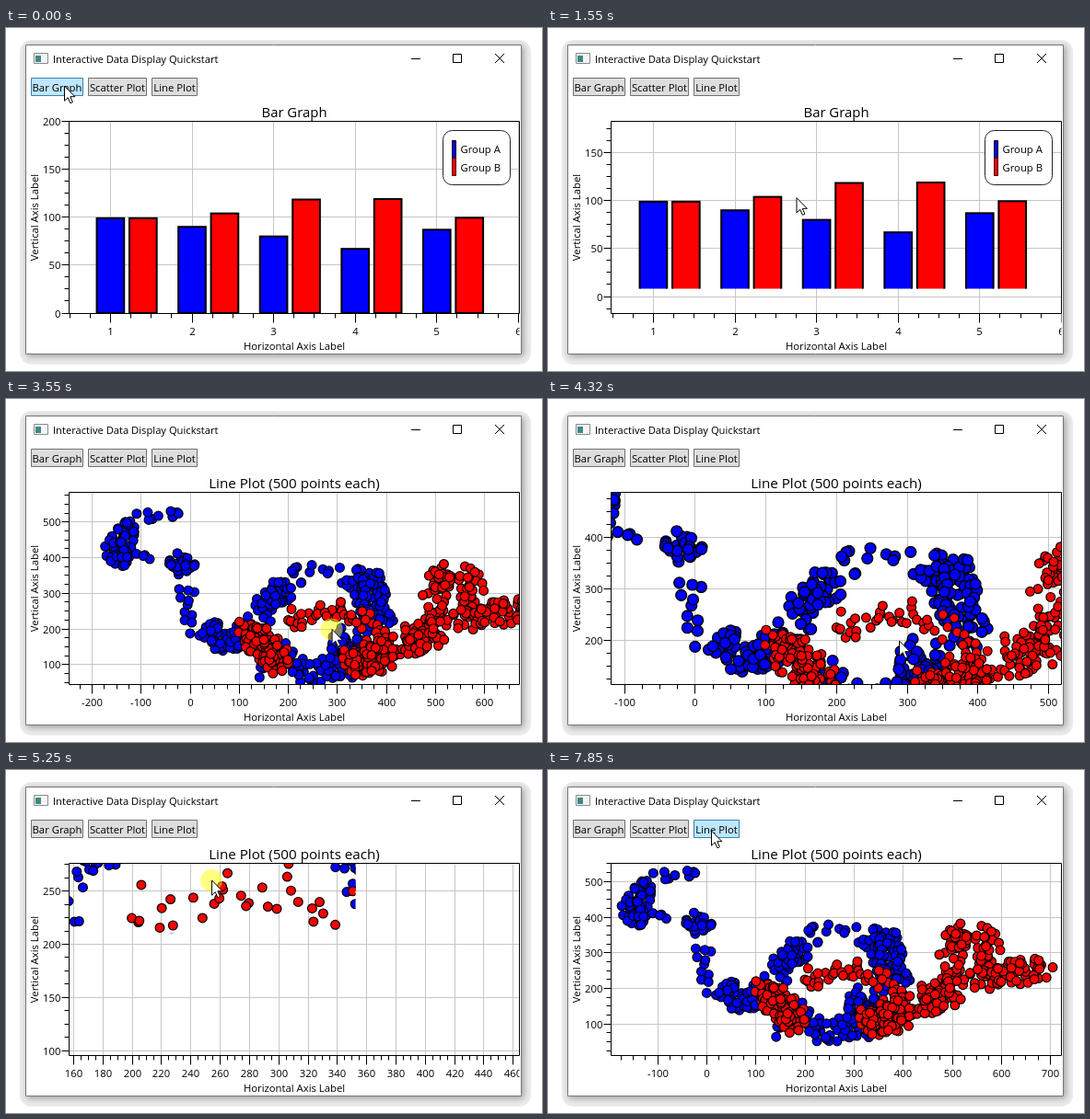
Animation, 582 px wide and 373 px high, one loop 8 s. Source, as an HTML page with a canvas:

```html
<!DOCTYPE html>
<html lang="en">
<head>
<meta charset="utf-8">
<title>Interactive Data Display Quickstart</title>
<style>
  html, body { margin: 0; width: 100%; height: 100%; overflow: hidden; background: #fff; }
  canvas { display: block; }
</style>
</head>
<body>
<canvas id="stage" width="582" height="373"></canvas>
<script>
const ctx = document.getElementById('stage').getContext('2d');
const LOOP = 8000;
const PLOT = { left: 68.5, top: 101.5, right: 557.5, bottom: 310.5 };
const BLUE = '#0000ff', RED = '#ff0000';

// A view maps data to pixels: X = ox + sx * x, Y = oy - sy * y
const BARS = { sx: 88.6, ox: 24.8, sy: 1.042, oy: 310 };
const SCATTER = { sx: 0.533, ox: 172.5, sy: 0.3875, oy: 315 };
const SWAP = 2480, RESET = 7300;

// Mouse moves: start time, end time, destination x, y
const HOME = { x: 63, y: 63 };
const MOVES = [
  [70, 390, 269, 203],
  [620, 840, 225, 215],
  [840, 1080, 313, 233],
  [1080, 1470, 270, 185],
  [1550, 1850, 120, 82],
  [2020, 2330, 118, 66],
  [2480, 2620, 211, 142],
  [2620, 2930, 326, 238],
  [3170, 3930, 381, 263],
  [4660, 4780, 327, 192],
  [4780, 4940, 401, 253],
  [4940, 5250, 223, 120],
  [5250, 5500, 240, 120],
  [5740, 5950, 170, 321],
  [5950, 6350, 301, 321],
  [6350, 6520, 238, 285],
  [6600, 6750, 45, 210],
  [6750, 7050, 45, 319],
  [7460, 7850, 177, 66]
];

const drag = (t, end, mx, my) => ({ t, end, mx, my });
const zoom = t => ({ t, zoom: 1.2 });
const ACTIONS = [
  drag(620, 1550, 1, 1),
  { t: SWAP, view: SCATTER },
  drag(3170, 3930, 1, 1),
  zoom(4020),
  ...Array.from({ length: 5 }, (_, i) => zoom(4320 + 80 * i)),
  drag(4780, 5500, 1, 1),
  drag(5950, 6350, 1, 0),
  drag(6750, 7050, 0, 1),
  { t: RESET, view: SCATTER }
];

function pointer(t) {
  let p = HOME;
  for (const [start, end, x, y] of MOVES) {
    if (t <= start) break;
    const k = Math.min(1, (t - start) / (end - start));
    p = { x: p.x + (x - p.x) * k, y: p.y + (y - p.y) * k };
  }
  return p;
}

function viewAt(t) {
  let v = BARS;
  for (const a of ACTIONS) {
    if (a.t > t) break;
    const p = pointer(a.t);
    if (a.view) {
      v = a.view;
    } else if (a.zoom) {
      v = {
        sx: v.sx * a.zoom, ox: p.x + (v.ox - p.x) * a.zoom,
        sy: v.sy * a.zoom, oy: p.y + (v.oy - p.y) * a.zoom
      };
    } else {
      const q = pointer(Math.min(t, a.end));
      v = { ...v, ox: v.ox + (q.x - p.x) * a.mx, oy: v.oy + (q.y - p.y) * a.my };
    }
  }
  return v;
}

// The plot image is redrawn periodically; in between it is only moved and scaled
const PERIOD = 410, PHASE = 20;
const lastRedraw = t => Math.floor((t - PHASE) / PERIOD) * PERIOD + PHASE;
const lastRescale = t => Math.max(...ACTIONS.filter(a => !a.end && a.t <= t).map(a => a.t));

function makeRandom(seed) {
  return () => (seed = (seed * 16807) % 2147483647) / 2147483647;
}

// Scatters points along a trail of [x, y, count], given in pixels of the fitted view;
// the more points a stretch has, the wider it spreads
function makeCloud(trail, seed) {
  const random = makeRandom(seed);
  const points = [];
  trail.forEach(([x, y, count], i) => {
    const [px, py] = trail[Math.max(0, i - 1)];
    const spread = 5 + 1.7 * Math.sqrt(count);
    for (let n = 0; n < count; n++) {
      const k = random(), angle = random() * 2 * Math.PI, r = spread * Math.sqrt(random());
      points.push({
        x: (px + (x - px) * k + r * Math.cos(angle) - SCATTER.ox) / SCATTER.sx,
        y: (SCATTER.oy - (py + (y - py) * k + r * Math.sin(angle))) / SCATTER.sy
      });
    }
  });
  return points;
}

const blueCloud = makeCloud([
  [157, 114, 3], [110, 122, 9], [95, 145, 20], [95, 162, 34], [110, 158, 12],
  [155, 163, 7], [172, 172, 20], [166, 232, 12], [195, 242, 3], [212, 250, 36],
  [240, 240, 34], [260, 205, 28], [272, 196, 34], [295, 172, 10], [345, 180, 7],
  [368, 190, 30], [368, 212, 56], [386, 236, 22], [342, 250, 7], [345, 278, 60],
  [292, 281, 44], [266, 260, 16], [248, 286, 10]
], 4271);

const redCloud = makeCloud([
  [235, 242, 10], [262, 262, 44], [270, 272, 46], [245, 245, 10], [290, 224, 12],
  [335, 217, 20], [372, 232, 14], [382, 260, 5], [348, 274, 56], [362, 278, 20],
  [408, 250, 42], [440, 242, 48], [440, 190, 36], [448, 177, 22], [485, 182, 20],
  [466, 226, 20], [505, 222, 36], [540, 213, 28]
], 977);

const BAR_A = [99, 90, 80, 67, 87], BAR_B = [99, 104, 118.5, 119, 99.5];
const BUTTONS = [['Bar Graph', 27, 57], ['Scatter Plot', 89, 64], ['Line Plot', 158, 50]];

function text(string, x, y, size = 11.3, align = 'left') {
  ctx.font = `${size}px "Open Sans", "Noto Sans", sans-serif`;
  ctx.textAlign = align;
  ctx.fillStyle = '#000';
  ctx.fillText(string, x, y);
}

function line(x0, y0, x1, y1, color = '#000') {
  ctx.strokeStyle = color;
  ctx.lineWidth = 1;
  ctx.beginPath();
  ctx.moveTo(x0, y0);
  ctx.lineTo(x1, y1);
  ctx.stroke();
}

function box(x, y, w, h, fill, stroke, radius = 0) {
  ctx.beginPath();
  ctx.roundRect(x, y, w, h, radius);
  if (fill) { ctx.fillStyle = fill; ctx.fill(); }
  if (stroke) { ctx.strokeStyle = stroke; ctx.lineWidth = 1; ctx.stroke(); }
}

function drawWindow(mouse) {
  box(0, 0, 582, 373, '#fff');
  box(15, 13, 555, 353, '#ebebeb', null, 13);
  ctx.save();
  ctx.shadowColor = 'rgba(0,0,0,.35)';
  ctx.shadowBlur = 7;
  ctx.shadowOffsetX = ctx.shadowOffsetY = 2;
  box(21, 18, 539, 337, '#fff');
  ctx.restore();
  box(21.5, 18.5, 538, 336, '#fff', '#777');

  box(30.5, 27.5, 15, 11, '#f4f4f4', '#8a8a8a');
  box(32, 30, 6, 7, '#3c8a84');
  text('Interactive Data Display Quickstart', 51, 38, 11.2);
  line(440, 33.5, 450, 33.5);
  box(485.5, 28.5, 9, 9, null, '#000');
  line(531, 28, 541, 38);
  line(541, 28, 531, 38);

  for (const [label, x, w] of BUTTONS) {
    const hover = mouse.x >= x && mouse.x <= x + w && mouse.y >= 54 && mouse.y <= 74;
    box(x + 0.5, 54.5, w - 1, 19, hover ? '#bee6fd' : '#ddd', hover ? '#3c7fb1' : '#707070');
    text(label, x + w / 2, 69, 11.3, 'center');
  }
}

function drawTitles(title, size) {
  const middle = (PLOT.left + PLOT.right) / 2;
  text(title, middle, 97, size, 'center');
  text('Horizontal Axis Label', middle, 350, 11.3, 'center');
  ctx.save();
  ctx.translate(35, (PLOT.top + PLOT.bottom) / 2);
  ctx.rotate(-Math.PI / 2);
  text('Vertical Axis Label', 0, 0, 11.3, 'center');
  ctx.restore();
}

function niceStep(scale, minGap) {
  for (let power = 1; ; power *= 10)
    for (const m of [1, 2, 5]) if (m * power * scale >= minGap) return m * power;
}

// Calls visit(pixel, value, isMajor) for every tick between the two data limits
function eachTick(low, high, step, toPixel, visit) {
  const minor = step / 4, slack = step * 0.01;
  for (let i = Math.ceil((low - slack) / minor); i * minor <= high + slack; i++)
    visit(Math.round(toPixel(i * minor) - 0.5) + 0.5, Math.round(i * minor), i % 4 === 0);
}

function drawAxes(v) {
  const { left, top, right, bottom } = PLOT;
  const xStep = niceStep(v.sx, v.sx > 1 ? 31 : 45);
  const yStep = niceStep(v.sy, 30);
  ctx.save();
  ctx.beginPath();
  ctx.rect(22, 90, right - 22, 262);
  ctx.clip();
  eachTick((left - v.ox) / v.sx, (right - v.ox) / v.sx, xStep, d => v.ox + v.sx * d, (x, value, major) => {
    if (major) {
      line(x, top, x, bottom, '#c6c6c6');
      text(String(value), x, 334, 11.3, 'center');
    }
    line(x, bottom, x, bottom + (major ? 10 : 5));
  });
  eachTick((v.oy - bottom) / v.sy, (v.oy - top) / v.sy, yStep, d => v.oy - v.sy * d, (y, value, major) => {
    if (major) {
      line(left, y, right, y, '#c6c6c6');
      text(String(value), 59.5, y + 4, 11.3, 'right');
    }
    line(left - (major ? 8 : 5), y, left, y);
  });
  ctx.restore();
}

// Clips to the part of the plot that the cached image covers in the current view
function withCache(v, cached, draw) {
  const kx = v.sx / cached.sx, ky = v.sy / cached.sy;
  const { left, top, right, bottom } = PLOT;
  ctx.save();
  ctx.beginPath();
  ctx.rect(left, top, right - left, bottom - top);
  ctx.clip();
  ctx.beginPath();
  ctx.rect(v.ox + (left - cached.ox) * kx, v.oy + (top - cached.oy) * ky,
    (right - left) * kx, (bottom - top) * ky);
  ctx.clip();
  draw(kx);
  ctx.restore();
}

function drawBars(v, heights, offset, color) {
  const width = 0.335 * v.sx;
  ctx.fillStyle = color;
  ctx.strokeStyle = '#000';
  ctx.lineWidth = 2;
  heights.forEach((height, i) => {
    const x = v.ox + (i + 1 + offset) * v.sx - width / 2, h = height * v.sy;
    ctx.fillRect(x, v.oy - h, width, h);
    ctx.strokeRect(x, v.oy - h, width, h);
  });
}

function drawCloud(v, points, color, scale) {
  ctx.fillStyle = color;
  ctx.strokeStyle = '#000';
  ctx.lineWidth = 1.2 * scale;
  for (const p of points) {
    ctx.beginPath();
    ctx.arc(v.ox + v.sx * p.x, v.oy - v.sy * p.y, 4.9 * scale, 0, 7);
    ctx.fill();
    ctx.stroke();
  }
}

function drawLegend() {
  box(474.5, 111.5, 73, 59, '#fff', '#222', 10);
  box(484.5, 122.5, 4, 19, BLUE, '#000');
  box(484.5, 141.5, 4, 19, RED, '#400');
  text('Group A', 493.5, 136);
  text('Group B', 493.5, 156);
}

const ARROW = new Path2D('M0 0V16.2L3.7 12.7L6.3 18.7L8.9 17.6L6.3 11.7H11.4Z');

function drawMouse({ x, y }, pressed) {
  if (pressed) {
    ctx.fillStyle = 'rgba(255,255,0,.5)';
    ctx.beginPath();
    ctx.arc(x, y, 12, 0, 7);
    ctx.fill();
  }
  ctx.save();
  ctx.translate(x + 0.5, y);
  ctx.fillStyle = '#fff';
  ctx.strokeStyle = '#000';
  ctx.lineWidth = 1;
  ctx.fill(ARROW);
  ctx.stroke(ARROW);
  ctx.restore();
}

function draw(t) {
  const mouse = pointer(t), v = viewAt(t), bars = t < SWAP;
  const cached = viewAt(lastRedraw(t));
  drawWindow(mouse);
  if (bars) drawTitles('Bar Graph', 14.9);
  else drawTitles('Line Plot (500 points each)', 15.2);
  drawAxes(v);

  if (bars) {
    withCache(v, cached, () => {
      drawBars(v, BAR_A, 0, BLUE);
      drawBars(v, BAR_B, 0.4, RED);
    });
  }
  // Blue appears first; red is also redrawn at once whenever the scale changes
  if (t >= SWAP + 70) withCache(v, cached, k => drawCloud(v, blueCloud, BLUE, k));
  if (t >= SWAP + 220) {
    const fresh = viewAt(Math.max(lastRedraw(t), lastRescale(t)));
    withCache(v, fresh, k => drawCloud(v, redCloud, RED, k));
  }

  box(PLOT.left, PLOT.top, PLOT.right - PLOT.left, PLOT.bottom - PLOT.top, null, '#000');
  if (bars) drawLegend();
  drawMouse(mouse, ACTIONS.some(a => a.end && t >= a.t && t < a.end));
}

const start = performance.now();
function tick() {
  draw((performance.now() - start) % LOOP);
  requestAnimationFrame(tick);
}
tick();
</script>
</body>
</html>
```
